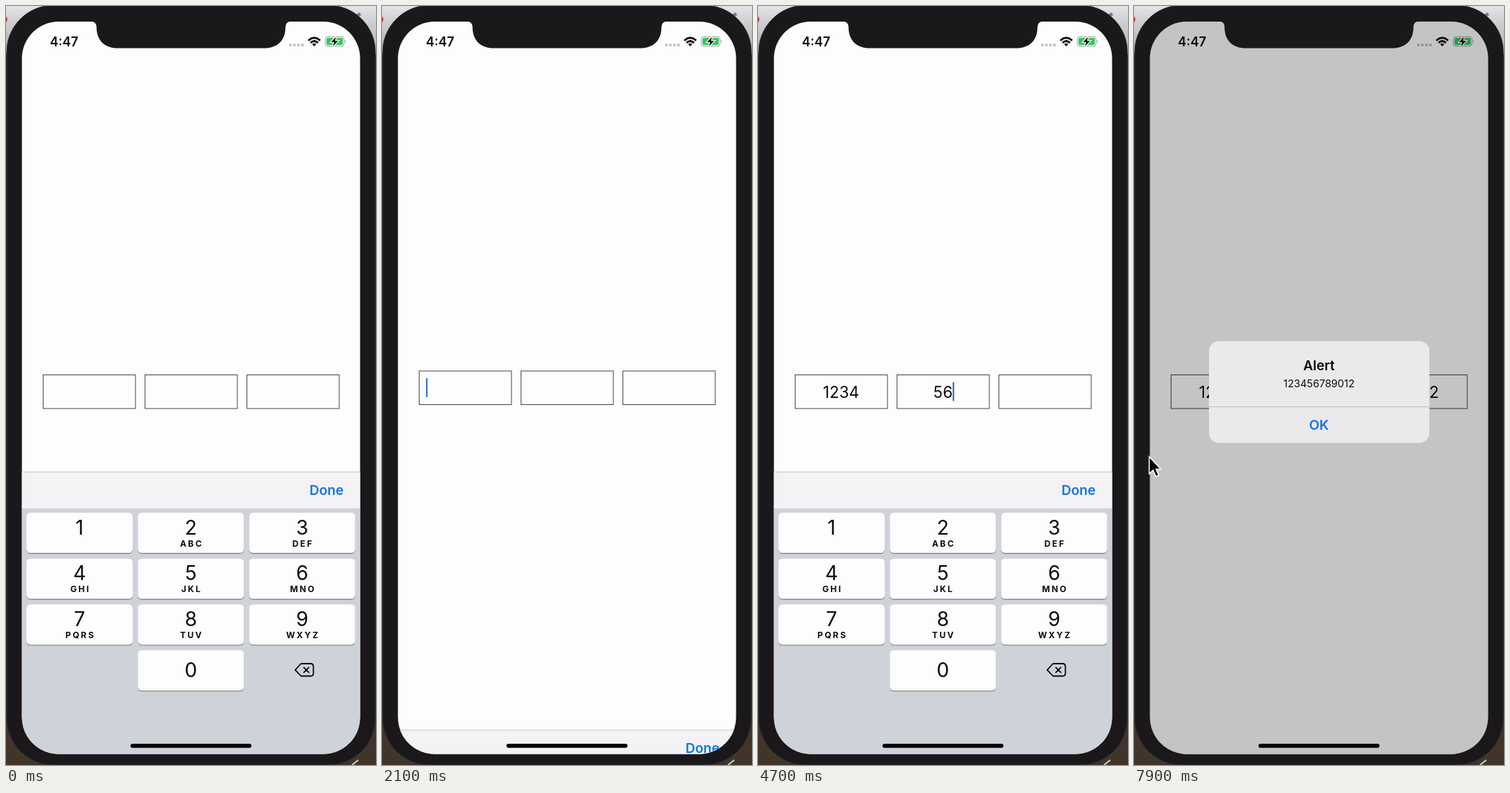
An HTML page for the animation above (8 s loop, 523 by 1071 pixels).

```html
<!DOCTYPE html>
<html lang="en">
<head>
<meta charset="utf-8">
<title>Grouped number entry</title>
<style>
  html, body { margin: 0; height: 100%; overflow: hidden; background: #2b2924; }
  svg { display: block; width: 100vw; height: 100vh; }
  text { font-family: Inter, sans-serif; fill: #0b0a0c; }
  .mid { text-anchor: middle; }
  .semi { font-weight: 600; font-size: 19px; }
  .blue { fill: #0e75e8; }
  .digit { font-size: 28px; }
  .letters { font-size: 12px; font-weight: 700; letter-spacing: 2.4px; }
  .value { font-size: 22.5px; }
</style>
</head>
<body>
<svg viewBox="0 0 523 1071">
  <defs>
    <linearGradient id="window" x2="0" y2="1">
      <stop stop-color="#e4e3e5"/><stop offset="1" stop-color="#a9a8aa"/>
    </linearGradient>
    <clipPath id="glass"><rect x="22.5" y="22" width="478" height="1033.5" rx="52"/></clipPath>
    <mask id="boltGap">
      <rect x="450" y="40" width="32" height="20" fill="#fff"/>
      <path d="M466.5 43.5L459.5 51H464L462 57L469.5 49.200H465Z" stroke="#000" stroke-width="2.500"/>
    </mask>
  </defs>

  <rect width="523" height="68" fill="url(#window)"/>
  <circle cx="-4" cy="19" r="6" fill="#c8443c"/>
  <circle cx="499" cy="12" r="2.500" fill="#7b7a7c"/>
  <rect y="1000" width="523" height="71" fill="#41352a"/>
  <path d="M489 1071L498 1064" stroke="#d8d5d0" stroke-width="2"/>
  <rect x="1" y="-1" width="521" height="1072" rx="66" fill="#1a181b" stroke="#302e31"/>

  <g clip-path="url(#glass)">
    <rect x="22" y="22" width="479" height="1034" fill="#fefdfe"/>
    <g id="form">
      <g id="fields"></g>
      <rect id="caret" width="2.200" height="27" rx="1" fill="#356bcb"/>
    </g>
    <g id="keyboard">
      <rect x="22" y="709" width="479" height="420" fill="#cfd2d9"/>
      <rect x="22" y="657" width="479" height="52" fill="#f4f2f5"/>
      <path d="M22 657.500H501" stroke="#c5c4c7"/>
      <text class="semi blue" x="429" y="690">Done</text>
      <g id="keys"></g>
      <g fill="none" stroke="#0b0a0c" stroke-width="1.800" stroke-linejoin="round" stroke-linecap="round">
        <path d="M417 928H430.500Q434.500 928 434.500 932V941.500Q434.500 945.500 430.500 945.500H417L408.800 936.800Z"/>
        <path d="M421 933.300L428 940.300M428 933.300L421 940.300"/>
      </g>
    </g>
    <g id="banner">
      <rect x="22" y="22" width="479" height="85" fill="#004b00"/>
      <text id="progress" class="mid" x="261.500" y="95" style="fill:#f2f5f2;font-size:13.600px"></text>
    </g>

    <text class="semi" x="62" y="56.500" style="font-size:18px">4:47</text>
    <g id="signal" fill="#000" fill-opacity=".24"></g>
    <g fill="none" stroke="#0b0a0c" stroke-width="2.800">
      <path d="M427.400 48.800Q435.700 41 444 48.800"/>
      <path d="M430.500 52Q435.700 47 441 52"/>
      <path d="M432.700 53.800Q435.700 51.500 438.700 53.800L435.700 57Z" fill="#0b0a0c" stroke="none"/>
    </g>
    <g mask="url(#boltGap)">
      <rect x="451.300" y="43.300" width="26.500" height="13.400" rx="3.800" fill="none" stroke="#000" stroke-opacity=".4"/>
      <rect x="453" y="45" width="23.100" height="10" rx="2.300" fill="#33c659"/>
    </g>
    <path d="M479.300 48Q481.600 50 479.300 52Z" fill="#000" fill-opacity=".4"/>
    <path d="M466.500 43.500L459.500 51H464L462 57L469.500 49.200H465Z" fill="#0b0a0c"/>

    <rect id="dim" x="22" y="22" width="479" height="1034" fill="#08050a" fill-opacity=".23"/>
    <g id="alert">
      <rect x="106" y="473" width="311.500" height="143.500" rx="14" fill="#ebe9ec"/>
      <path d="M106 565.500H417.500" stroke="#bfbdc0"/>
      <text class="mid semi" x="261.500" y="514.500">Alert</text>
      <text class="mid" x="261.500" y="538" style="font-size:14.500px">123456789012</text>
      <text class="mid semi blue" x="261.500" y="598">OK</text>
    </g>
    <rect x="176" y="1041" width="171" height="5.700" rx="2.850" fill="#000"/>
  </g>
  <path d="M119 20V21.500Q128 21.500 128 30C128 49 140 59.500 158 59.500H365C383 59.500 395 49 395 30Q395 21.500 404 21.500V20Z" fill="#1a181b"/>
  <path id="pointer" d="M21.500 636V660L27 655L31 664L35 662L31 653.500H38Z" fill="#000" stroke="#fff" stroke-width="1.500"/>
</svg>
<script>
const LOOP = 8000;
const RELOAD = 880, MOUNT = 2000, FOCUS = 2075, SETTLE = 2200, SUBMIT = 7280;
const DIGITS = '123456789012';
const STROKES = [3200, 3500, 3800, 4100, 4400, 4650, 5100, 5500, 6200, 6600, 7000, 7200];
const MODULES = 5380;

const $ = id => document.getElementById(id);
const clamp = v => Math.min(1, Math.max(0, v));
const ramp = (t, start, length) => clamp((t - start) / length);
const show = (el, opacity) => el.setAttribute('opacity', +opacity);
const spring = (t, start) => {
  const x = Math.max(0, t - start) * 0.0185;
  return 1 - (1 + x) * Math.exp(-x);
};

const fieldX = i => 52.5 + 144 * i;
$('fields').innerHTML = [0, 1, 2].map(i =>
  `<rect x="${fieldX(i)}" y="520.5" width="130.500" height="47.500" fill="none" stroke="#444246"/>
   <text class="mid value" x="${fieldX(i) + 65}" y="552.500"></text>`).join('');
const values = [...document.querySelectorAll('.value')];

$('keys').innerHTML = ['', 'ABC', 'DEF', 'GHI', 'JKL', 'MNO', 'PQRS', 'TUV', 'WXYZ', '', ''].map((letters, i) => {
  if (i === 9) return '';
  const x = 29 + 157.3 * (i % 3), y = 715 + 64.7 * Math.floor(i / 3), cx = x + 75;
  const zero = i === 10;
  return `<rect x="${x}" y="${y + 1.2}" width="150" height="57" rx="5.500" fill="#898b90"/>
    <rect x="${x}" y="${y}" width="150" height="56.800" rx="5.500" fill="#fefdfe"/>
    <text class="mid digit" x="${cx}" y="${y + (zero ? 37.5 : 30.5)}">${zero ? 0 : i + 1}</text>
    <text class="mid letters" x="${cx + 1.2}" y="${y + 47.5}">${letters}</text>`;
}).join('');

$('signal').innerHTML = [0, 1, 2, 3].map(i => `<circle cx="${402 + 5.7 * i}" cy="55" r="2.100"/>`).join('');

function drawForm(t) {
  show($('form'), t < RELOAD || t >= MOUNT);
  const settled = t < RELOAD || t >= SETTLE;
  $('form').setAttribute('transform', `translate(0 ${settled ? 0 : -5.5})`);

  const typed = STROKES.filter(s => s <= t).length;
  values.forEach((el, i) => {
    el.textContent = DIGITS.slice(4 * i, Math.min(4 * i + 4, typed));
  });

  const active = Math.min(2, Math.floor(typed / 4));
  const width = values[active].getComputedTextLength();
  $('caret').setAttribute('x', fieldX(active) + (width ? 65 + width / 2 : 9.7));
  $('caret').setAttribute('y', 530.5);
  const touched = typed ? STROKES[typed - 1] : t < RELOAD ? -800 : MOUNT;
  show($('caret'), t < SUBMIT && (t - touched) % 1000 < 550);
}

function drawKeyboard(t) {
  const hidden = t < FOCUS ? spring(t, RELOAD)
    : t < SUBMIT ? 1 - spring(t, FOCUS)
    : spring(t, SUBMIT);
  $('keyboard').setAttribute('transform', `translate(0 ${398 * hidden})`);
}

function drawBanner(t) {
  show($('banner'), t < 850 ? 0 : 1 - ramp(t, 1700, 250));
  const done = Math.round(MODULES * ramp(t, 850, 556.8));
  const percent = Math.floor(100 * done / MODULES);
  $('progress').textContent = `Downloading JavaScript bundle ${percent}% (${done}/${MODULES})...`;
}

function drawAlert(t) {
  const shown = spring(t, SUBMIT + 50);
  show($('dim'), shown);
  show($('alert'), shown);
  const scale = 1.2 - 0.2 * shown;
  $('alert').setAttribute('transform', `translate(261.5 544.5) scale(${scale}) translate(-261.5 -544.5)`);
  show($('pointer'), t >= 7800);
}

function draw(now) {
  const t = now % LOOP;
  drawForm(t);
  drawKeyboard(t);
  drawBanner(t);
  drawAlert(t);
  requestAnimationFrame(draw);
}
requestAnimationFrame(draw);
</script>
</body>
</html>
```
